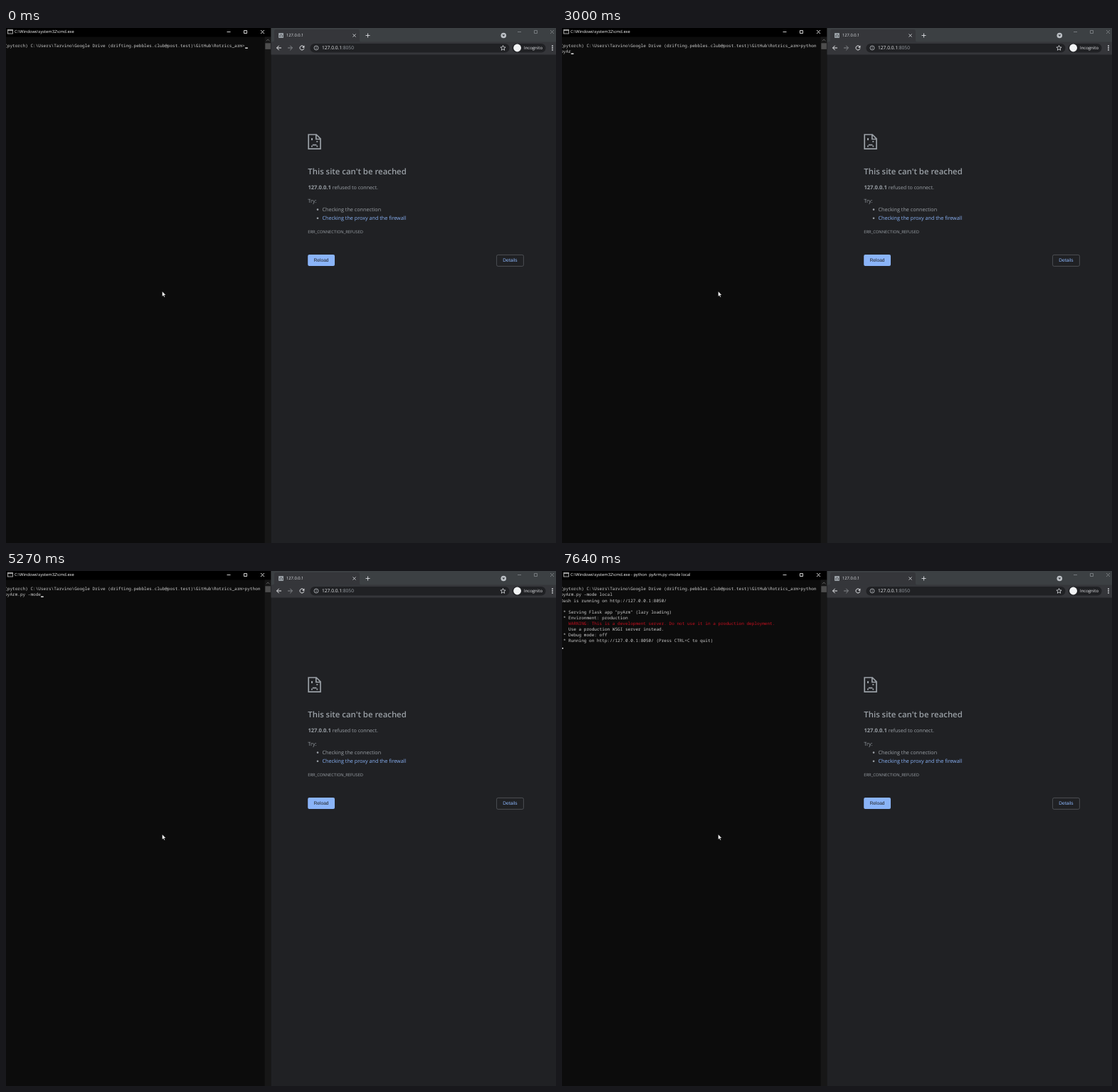
Recreate the animation shown at these times as an HTML page. Size 773 by 725 pixels, loop 8 s.

```html
<!DOCTYPE html>
<html lang="en">
<head>
<meta charset="utf-8">
<title>Terminal and browser</title>
<style>
  html, body { margin: 0; width: 100%; height: 100%; overflow: hidden; background: #0c0c0c; }
  svg { display: block; width: 773px; height: 725px; }
  text { white-space: pre; text-rendering: geometricPrecision; font-family: "Open Sans", "Noto Sans", sans-serif; }
  #screen text { font: 6.057px "Noto Sans Mono", "DejaVu Sans Mono", monospace; fill: #ccc; }
  #screen .warn { fill: #c50f1f; }
  .line { fill: none; }
  .page { font-size: 7.22px; fill: #9aa0a6; }
  .button { font: 6.65px "Liberation Sans", Arial, sans-serif; }
</style>
</head>
<body>
<svg viewBox="0 0 773 725">
  <!-- console window -->
  <rect width="373" height="725" fill="#0c0c0c"/>
  <rect width="373" height="12.5"/>
  <rect x="2.5" y="2.5" width="7" height="5.5" fill="#111" stroke="#c8c8c8" stroke-width=".8"/>
  <path d="M2.5 3.2h7" stroke="#c8c8c8"/>
  <text id="title" x="12" y="7.4" font-size="5.74" fill="#fff"></text>
  <path class="line" stroke="#fff" stroke-width=".8" d="M310.5 5.5h5M334.5 3.5h4v4h-4zM358 3l5 5M363 3l-5 5"/>
  <rect x="363.7" y="12.5" width="9" height="712.5" fill="#171717"/>
  <path class="line" stroke="#777" stroke-width=".8" d="M366 18.2l2.2-2.2 2.2 2.2"/>
  <rect x="364.3" y="21.3" width="7.6" height="8.6" fill="#4d4d4d"/>
  <g id="screen"></g>
  <rect id="caret" width="3.63" height="1.4" fill="#f2f2f2"/>

  <!-- browser window -->
  <rect x="372.5" width="400.5" height="725" fill="#202124"/>
  <rect x="372.5" width="400.5" height="20" fill="#3c4043"/>
  <path d="M374 20q3 0 3-3V5q0-3 3-3h114q3 0 3 3v12q0 3 3 3z" fill="#35363a"/>
  <rect x="372.5" y="19.5" width="400.5" height="18" fill="#35363a"/>
  <rect x="383" y="7" width="7" height="7" rx=".7" fill="#9aa0a6"/>
  <path d="M385 10v2.5M386.7 8.5v1.5M388.3 10v2.5" stroke="#35363a" stroke-width=".8"/>
  <text x="394" y="12.2" font-size="5.75" fill="#dadce0">127.0.0.1</text>
  <path class="line" stroke="#dadce0" stroke-width=".9" d="M487.5 8.5l4 4M491.5 8.5l-4 4M505.5 10.5h6M508.5 7.5v6"/>
  <circle cx="699.3" cy="10.5" r="3.8" fill="#bdc1c6"/>
  <path d="M697.3 9.5h4l-2 2.5z" fill="#3c4043"/>
  <path class="line" stroke="#85888c" stroke-width=".8" d="M719 5.5h5M742.5 3.5h4v4h-4zM765 3l5 5M770 3l-5 5"/>

  <path class="line" stroke="#e8eaed" d="M387 28h-6.3M383.7 24.8l-3.2 3.2 3.2 3.2"/>
  <path class="line" stroke="#85888c" d="M396 28h6.3M399.3 24.8l3.2 3.2-3.2 3.2"/>
  <path class="line" stroke="#e8eaed" d="M418.4 26.2a3 3 0 1 0 .5 2.5"/>
  <path d="M419.4 24.5v3.2h-3.2z" fill="#e8eaed"/>
  <rect x="427.5" y="22" width="280" height="12.5" rx="6.2" fill="#202124"/>
  <circle class="line" cx="436" cy="28" r="3" stroke="#bdc1c6" stroke-width=".8"/>
  <path d="M436 27.6v2M436 26v.8" stroke="#bdc1c6" stroke-width=".8"/>
  <text x="444" y="30.3" font-size="6.63" fill="#e8eaed">127.0.0.1<tspan fill="#9aa0a6">:8050</tspan></text>
  <path class="line" stroke="#dadce0" stroke-width=".8" d="M698.5 24.5l1 2.4 2.6.2-2 1.7.6 2.5-2.2-1.4-2.2 1.4.6-2.5-2-1.7 2.6-.2z"/>
  <rect x="711.5" y="22" width="47" height="12.5" rx="6.2" fill="#202124"/>
  <circle cx="718.6" cy="28" r="5.4" fill="#f1f3f4"/>
  <text x="728" y="30.1" font-size="6" fill="#e8eaed">Incognito</text>
  <g fill="#e8eaed"><circle cx="768" cy="25.2" r=".9"/><circle cx="768" cy="28" r=".9"/><circle cx="768" cy="30.8" r=".9"/></g>

  <!-- error page -->
  <g class="page">
    <path fill="none" stroke="#9aa0a6" stroke-width="1.7" d="M425.2 150h11l5.8 5.8v14.4h-16.8zM435.8 150v6.5h6.2"/>
    <path d="M429 155h2v3h-2zM436.3 159h2v1.8h-2zM430.8 163.8h5.6v1.8h-5.6zM429 165.6h1.8v1.8h-1.8zM436.4 165.6h1.8v1.8h-1.8z"/>
    <text x="424.3" y="206.2" font-size="11.38" font-weight="600">This site can't be reached</text>
    <text x="424.5" y="226.5" font-size="7.55" font-weight="700">127.0.0.1</text>
    <text x="458.8" y="226.5" font-size="7.13">refused to connect.</text>
    <text x="424.3" y="245.9">Try:</text>
    <circle cx="438" cy="255.6" r="1.3"/>
    <text x="444.5" y="258">Checking the connection</text>
    <circle cx="438" cy="267.7" r="1.3"/>
    <text x="444.5" y="270.1" fill="#8ab4f8">Checking the proxy and the firewall</text>
    <text x="424.3" y="289.3" font-size="5.81">ERR_CONNECTION_REFUSED</text>
  </g>
  <rect x="424.2" y="319" width="37.8" height="16" rx="2" fill="#8ab4f8"/>
  <text class="button" x="443" y="329.2" text-anchor="middle" fill="#202124">Reload</text>
  <rect class="line" x="689.6" y="319.4" width="37.8" height="16" rx="2" stroke="#5f6368" stroke-width=".7"/>
  <text class="button" x="708.4" y="329.4" text-anchor="middle" fill="#8ab4f8">Details</text>

  <path d="M219.5 370.7v7.3l1.7-1.5 1.2 2.6 1.1-.5-1.2-2.5h2.3z" fill="#fff" stroke="#000" stroke-width=".4"/>
</svg>
<script>
const LOOP = 8000, COLS = 100, CELL = 3.634, LEFT = -1.8, ROW = 8.06, BASE = 27.4;
const PROMPT = String.raw`(pytorch) C:\Users\Tarvino\Google Drive (drifting.pebbles.club@post.test)\GitHub\Rotrics_arm>`;
const SHELL = String.raw`C:\Windows\system32\cmd.exe`;
const OUTPUT = `Dash is running on http://127.0.0.1:8050/

 * Serving Flask app "pyArm" (lazy loading)
 * Environment: production
   WARNING: This is a development server. Do not use it in a production deployment.
   Use a production WSGI server instead.
 * Debug mode: off
 * Running on http://127.0.0.1:8050/ (Press CTRL+C to quit)
`;

// [time, text added, caret visible (default yes)]
const EVENTS = [
  [70, 'p'], [270, 'y'], [400, 't'], [530, 'h'], [730, 'o'], [870, 'n'], [940, '', 0], [1010, ' '],
  [1470, '', 0], [2000, ''], [2070, 'p'], [2330, 'y'], [2530, '', 0], [2730, 'A'],
  [3000, 'r'], [3070, '', 0], [3210, 'm'], [3470, '.'], [3600, '', 0], [3730, 'p'],
  [4130, 'y'], [4210, ' '], [4600, '', 0], [4670, '-'],
  [5000, 'm'], [5070, 'o'], [5130, 'd'], [5200, '', 0], [5270, 'e'], [5400, ' '], [5670, '', 0],
  [6000, 'l'], [6200, 'o', 0], [6330, 'c'], [6400, 'a'], [6530, 'l'], [6730, '\n'],
  [7260, '', 0], [7330, ''], [7640, OUTPUT]
];

const title = document.getElementById('title');
const caret = document.getElementById('caret');
const screen = document.getElementById('screen');
const rows = Array.from({ length: 11 }, (_, i) => {
  const row = document.createElementNS('http://www.w3.org/2000/svg', 'text');
  row.setAttribute('x', LEFT);
  row.setAttribute('y', BASE + i * ROW);
  return screen.appendChild(row);
});

function wrap(line) {
  const parts = [];
  for (let i = 0; i <= line.length; i += COLS) parts.push(line.slice(i, i + COLS));
  return parts;
}

function draw(t) {
  let text = PROMPT, visible = 1;
  for (const [time, added, on = 1] of EVENTS) {
    if (time > t) break;
    text += added;
    visible = on;
  }
  const lines = text.split('\n').flatMap(wrap);
  rows.forEach((row, i) => {
    const line = lines[i] || '';
    if (row.textContent === line) return;
    row.textContent = line;
    row.classList.toggle('warn', line.includes('WARNING'));
  });
  const last = lines.length - 1;
  caret.setAttribute('x', LEFT + lines[last].length * CELL);
  caret.setAttribute('y', BASE + .1 + last * ROW);
  caret.setAttribute('opacity', visible);
  title.textContent = SHELL + (t >= 6860 ? ' - python  pyArm.py -mode local' : '');
}

const start = performance.now();
function tick() {
  draw((performance.now() - start) % LOOP);
  requestAnimationFrame(tick);
}
tick();
</script>
</body>
</html>
```
